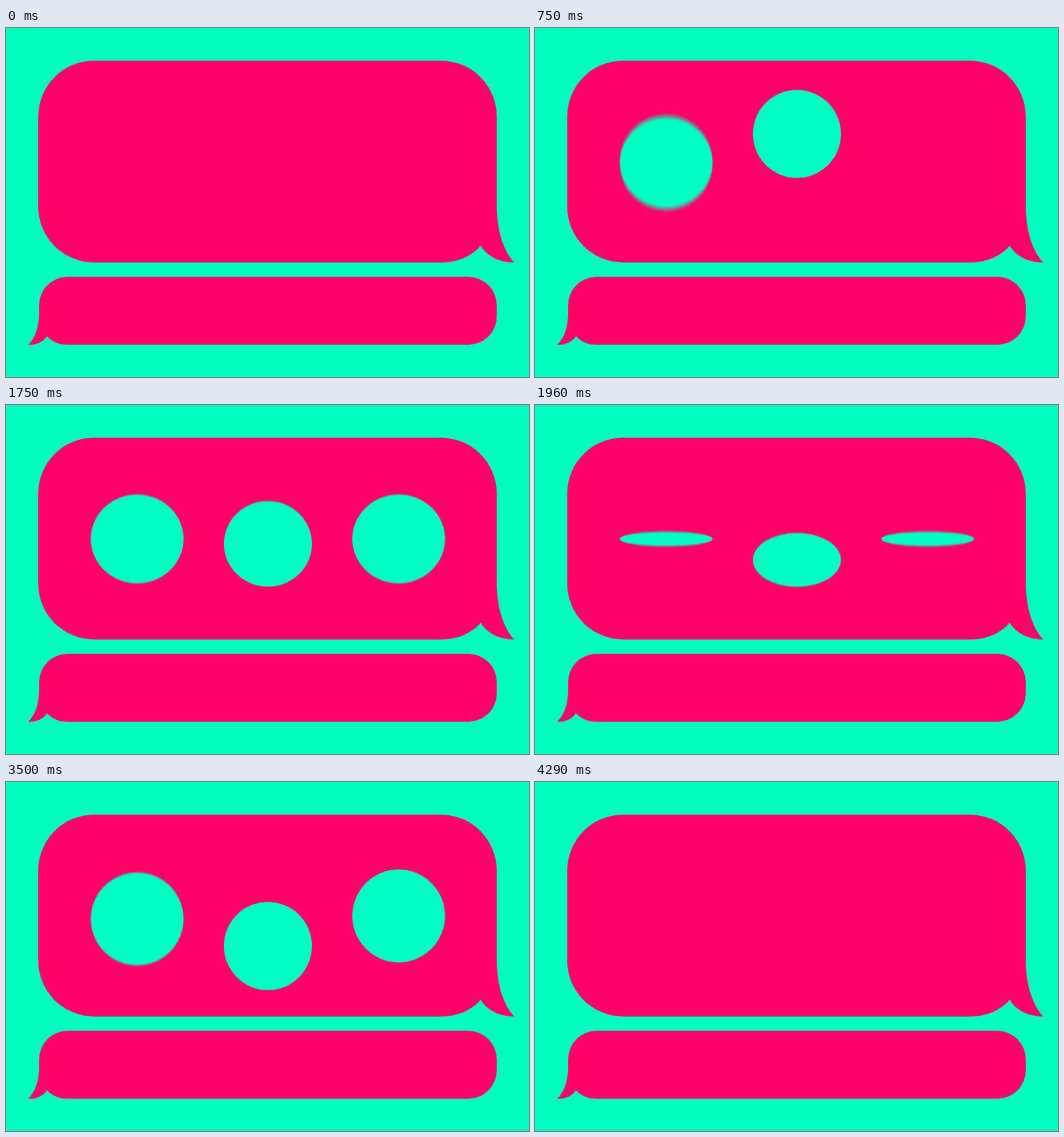
Animation, 600 px wide and 400 px high, one loop 5040 ms. Source, as an HTML page with a canvas:

```html
<!DOCTYPE html>
<html lang="en">
<head>
<meta charset="utf-8">
<title>Speech bubbles</title>
<style>
  html, body { margin: 0; width: 100%; height: 100%; overflow: hidden; background: #00ffbf; }
  svg, canvas { position: absolute; left: 0; top: 0; width: 600px; height: 400px; display: block; }
</style>
</head>
<body>
<svg viewBox="0 0 600 400" fill="#ff0068">
  <path d="M101 37.5H499A64 64 0 0 1 563 101.5V203C563 231 570 255 583 268.7C566 268.7 552 262 544.5 249.5C535 261 519 268.7 499 268.7H101A64 64 0 0 1 37 204.7V101.5A64 64 0 0 1 101 37.5Z"/>
  <path d="M70.5 285.3H530.5A32.5 32.5 0 0 1 563 317.8V330.5A32.5 32.5 0 0 1 530.5 363H70.5C61 363 53 360 47 353.3C43 360 35 363.3 25.5 363.3C34 354 38 343 38 326V317.8A32.5 32.5 0 0 1 70.5 285.3Z"/>
</svg>
<canvas></canvas>
<script>
const FPS = 24, LOOP = 5040, SAMPLES = 15, SHUTTER = 0.5;
const ENTER = 10, BLINK = 41, EXIT = 83, LENGTH = 14;
const UP = -37;

const dots = [
  { x: 150.5, r: 53.2, rest: 153.5, dip: 22, end: 153.5 },
  { x: 300.5, r: 50.5, rest: 158.3, dip: 20, end: 188, mouth: true },
  { x: 450.5, r: 53.2, rest: 153.5, dip: 22, end: 153.5 }
];

const canvas = document.querySelector('canvas');
const ctx = canvas.getContext('2d');
const ratio = window.devicePixelRatio || 1;
canvas.width = 600 * ratio;
canvas.height = 400 * ratio;
ctx.scale(ratio, ratio);
ctx.fillStyle = '#00ffbf';

// Eased value along keys [time, value, skew]; skew above 1 delays the move.
function track(k, keys) {
  if (k <= keys[0][0]) return keys[0][1];
  for (let i = 1; i < keys.length; i++) {
    const [t0, v0] = keys[i - 1], [t1, v1, skew = 1] = keys[i];
    if (k < t1) {
      const u = Math.pow((k - t0) / (t1 - t0), skew);
      return v0 + (v1 - v0) * u * u * (3 - 2 * u);
    }
  }
  return keys[keys.length - 1][1];
}

function pose(dot, i, frame) {
  const { rest, dip, end, mouth } = dot;
  if (frame < BLINK) {
    const k = frame - ENTER - 4 * i;
    return {
      y: track(k, [[0, rest], [4, rest + UP], [10, rest + dip, 1.28], [14, rest]]),
      s: track(k, [[0, 0], [4, 1]])
    };
  }
  if (frame < EXIT - 1) {
    const k = frame - BLINK;
    return {
      y: track(k, [[0, rest], [10, end]]),
      s: track(k, mouth ? [[0, 1], [6, 0.61], [10, 1.05], [13, 1]]
                        : [[0, 1], [8, 0], [11, 0], [19, 1]])
    };
  }
  const k = frame - EXIT - 3 * i;
  return {
    y: track(k, [[0, end], [4, rest + dip], [10, rest + UP], [14, rest]]),
    s: track(k, [[10, 1], [14, 0]])
  };
}

function draw(frame) {
  ctx.clearRect(0, 0, 600, 400);
  ctx.globalCompositeOperation = 'lighter';
  ctx.globalAlpha = 1 / SAMPLES;
  dots.forEach((dot, i) => {
    if (frame <= ENTER + 4 * i || frame >= EXIT + 3 * i + LENGTH) return;
    // Motion blur: average the dot over the open shutter.
    for (let j = 0; j < SAMPLES; j++) {
      const { y, s } = pose(dot, i, frame + SHUTTER * ((j + 0.5) / SAMPLES - 0.5));
      if (s < 0.002) continue;
      ctx.beginPath();
      ctx.ellipse(dot.x, y, dot.r, dot.r * s, 0, 0, 2 * Math.PI);
      ctx.fill();
    }
  });
}

const start = performance.now();
let shown = -1;
function tick() {
  const t = (performance.now() - start) % LOOP;
  const frame = Math.floor(t * FPS / 1000 + 0.06);
  if (frame !== shown) draw(shown = frame);
  requestAnimationFrame(tick);
}
tick();
</script>
</body>
</html>
```
